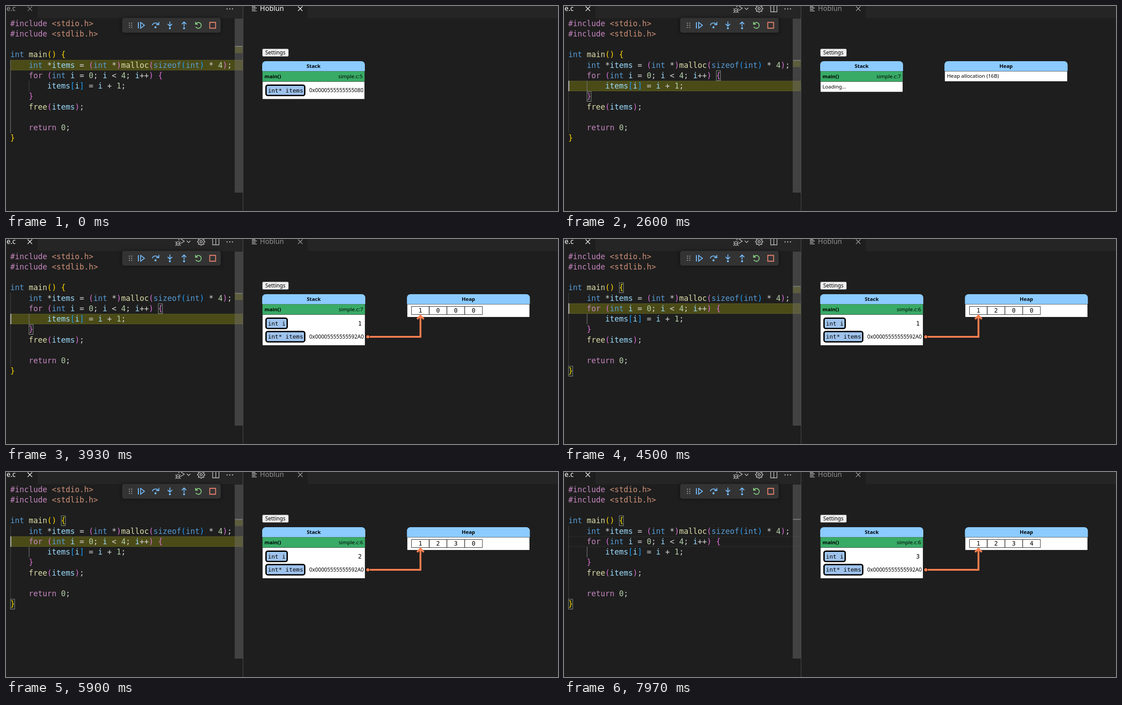
Recreate the animation shown at these times as an HTML page with a canvas. Size 1226 px wide and 457 px high, loop 8 s.

```html
<!DOCTYPE html>
<html lang="en">
<head>
<meta charset="utf-8">
<title>Debugger stepping through a loop</title>
<style>
html, body { margin: 0; width: 100%; height: 100%; overflow: hidden; background: #1e1e1e; }
canvas { display: block; }
</style>
</head>
<body>
<canvas id="stage" width="1226" height="457"></canvas>
<script>
const ctx = document.getElementById('stage').getContext('2d');
const LOOP = 8000, CODE_X = 9.4, CHAR_W = 10.26, ROW_H = 23.25;
const SANS = '"Noto Sans", sans-serif', MONO = '"DejaVu Sans Mono", monospace';
const CODE = `#include <stdio.h>
#include <stdlib.h>

int main() {
    int *items = (int *)malloc(sizeof(int) * 4);
    for (int i = 0; i < 4; i++) {
        items[i] = i + 1;
    }
    free(items);

    return 0;
}`.split('\n');

// [highlight off, line moves, brackets update, memory loaded, line, i, filled items]
const STEPS = [
  [1070, 1070, 1100, 1100, 6, 0, 0],
  [2470, 2570, 2600, 2630, 7, 0, 0],
  [3100, 3200, 3230, 3270, 6, 0, 1],
  [3830, 3830, 3900, 3930, 7, 1, 1],
  [4300, 4430, 4500, 4500, 6, 1, 2],
  [5200, 5200, 5230, 5270, 7, 2, 2],
  [5700, 5830, 5870, 5900, 6, 2, 3],
  [6500, 6500, 6700, 6700, 7, 3, 3],
  [7170, 7200, 7270, 7270, 6, 3, 4],
  [7970, 9000, 9000, 9000, 6, 3, 4]
];
const CURSOR_TOGGLES = [1070, 1500, 1970, 2470, 2570, 3100, 3200, 3670, 3830, 4300,
  4430, 4930, 5200, 5700, 5830, 6330, 6500, 7000, 7200, 7700];

function stateAt(t) {
  const s = { line: 5, highlight: true, bracketLine: 5, loading: false, i: null, filled: 0 };
  for (const [off, move, brackets, done, line, i, filled] of STEPS) {
    if (t >= off) s.highlight = false;
    if (t >= move) Object.assign(s, { line, highlight: true, loading: true });
    if (t >= brackets) s.bracketLine = line;
    if (t >= done) Object.assign(s, { loading: false, i, filled });
  }
  s.focused = t >= STEPS[0][0];
  s.cursor = CURSOR_TOGGLES.filter(x => x <= t).length % 2 === 1;
  return s;
}

const rowTop = n => 27.2 + (n - 1) * ROW_H;
const colX = n => CODE_X + n * CHAR_W;

function rect(x, y, w, h, fill) {
  ctx.fillStyle = fill;
  ctx.fillRect(x, y, w, h);
}
function box(x, y, w, h, radius, fill, stroke, lineWidth = 1) {
  ctx.beginPath();
  ctx.roundRect(x, y, w, h, radius);
  if (fill) { ctx.fillStyle = fill; ctx.fill(); }
  if (stroke) { ctx.strokeStyle = stroke; ctx.lineWidth = lineWidth; ctx.stroke(); }
}
function text(str, x, y, font, fill, align = 'left') {
  ctx.font = font;
  ctx.fillStyle = fill;
  ctx.textAlign = align;
  ctx.fillText(str, x, y);
}
function path(d, stroke, lineWidth = 1.6, x = 0, y = 0) {
  ctx.save();
  ctx.translate(x, y);
  ctx.strokeStyle = stroke;
  ctx.lineWidth = lineWidth;
  ctx.stroke(new Path2D(d));
  ctx.restore();
}
function dot(x, y, r, fill) {
  ctx.beginPath();
  ctx.arc(x, y, r, 0, 7);
  ctx.fillStyle = fill;
  ctx.fill();
}
const cross = (x, color) => path('M-5-5L5 5M5-5L-5 5', color, 1.4, x, 6);

function tokenColor(token, next) {
  if (/^(#|for$|return$)/.test(token)) return '#c586c0';
  if (/^<\w/.test(token)) return '#ce9178';
  if (/^(int|sizeof)$/.test(token)) return '#569cd6';
  if (/^\d/.test(token)) return '#b5cea8';
  if (/^\w/.test(token)) return next === '(' ? '#dcdcaa' : '#9cdcfe';
  return '#d4d4d4';
}
function drawCode() {
  const pairs = ['#ffd700', '#da70d6', '#179fff'];
  let depth = 0;
  CODE.forEach((line, row) => {
    for (const m of line.matchAll(/#\w+|<\w+\.h>|\w+|\S/g)) {
      const token = m[0];
      let color = tokenColor(token, line[m.index + token.length]);
      if ('([{'.includes(token)) color = pairs[depth++];
      else if (')]}'.includes(token)) color = pairs[--depth];
      text(token, colX(m.index), rowTop(row + 1) + 17.5, '17.04px ' + MONO, color);
    }
  });
}

function drawTabs(focused) {
  const left = focused ? '#ffffff' : '#a0a0a0', right = focused ? '#8f8f8f' : '#ffffff';
  const font = '15.4px ' + SANS, gray = '#c5c5c5';
  rect(0, 0, 1226, 27, '#252526');
  rect(0, 0, 70, 27, '#1e1e1e');
  rect(527, 0, 143, 27, '#1e1e1e');
  text('simple.c', 21.5, 11, font, left, 'right');
  cross(53, focused ? '#ffffff' : '#808080');
  path('M546 1.5h8M546 4.5h11M546 8h8M546 11.2h11', gray, 1.3);
  text('Hoblun', 564, 11, font, right);
  cross(653.5, focused ? '#a0a0a0' : '#ffffff');
  for (const x of [491, 497, 503]) dot(x, 6.5, 1.3, gray);
  if (!focused) return;
  path('M384 3V-3L396 5L388 10', gray, 1.4);
  path('M379 9a3 3.5 0 0 1 6 0v2a3 3.5 0 0 1-6 0zM376 6l3 2M388 6l-3 2M376 10.5h12M376 15l3-2M388 15l-3-2', gray, 1.2);
  path('M401.5 4l4 4l4-4', gray, 1.3);
  ctx.beginPath();
  for (let k = 0; k < 32; k++) {
    const a = (k - 0.5) * Math.PI / 16, r = k % 4 < 2 ? 8.2 : 6;
    ctx.lineTo(433.5 + r * Math.cos(a), 6 + r * Math.sin(a));
  }
  ctx.closePath();
  ctx.strokeStyle = gray;
  ctx.lineWidth = 1.4;
  ctx.stroke();
  path('M436 6a2.5 2.5 0 1 0-5 0a2.5 2.5 0 1 0 5 0', gray, 1.3);
  path('M459-3h14v16h-14zM466-3v16', gray, 1.4);
}

function drawToolbar() {
  const blue = '#75beff';
  ctx.save();
  ctx.shadowColor = 'rgba(0,0,0,.5)';
  ctx.shadowBlur = 8;
  box(258, 26.5, 219, 33, 5, '#333333');
  ctx.restore();
  for (let k = 0; k < 6; k++) rect(273 + k % 2 * 5, 37 + (k >> 1) * 4.7, 2.4, 2.4, '#8a8a8a');
  path('M294 36v14', blue, 2);
  path('M299 36.5v13l8.5-6.5z', blue, 1.8);
  path('M325 43a7.5 7 0 0 1 13.5-2M339.5 35.5v6h-6', blue, 1.8);
  dot(332, 47.5, 2.2, blue);
  path('M364 34.5v10M359 40l5 5l5-5', blue, 1.8);
  dot(364, 49.5, 2.2, blue);
  path('M395.5 46v-10M390.5 40.5l5-5l5 5', blue, 1.8);
  dot(395.5, 49.5, 2.2, blue);
  path('M421.5 40a6.5 6.5 0 1 1 0 6.5M421 35.5v5h5', '#89d185', 1.8);
  path('M452.5 36.5h13v13h-13z', '#f48771', 1.8);
}

function drawEditor(s) {
  const top = rowTop(s.line);
  rect(10, top, 516, 1.6, '#282828');
  rect(10, top + ROW_H - 1.6, 516, 1.6, '#282828');
  if (s.highlight) rect(10, top, 516, ROW_H, 'rgba(255,255,0,.2)');

  const outer = s.line === 5;
  rect(9.5, rowTop(5), 1.3, ROW_H * 7, outer ? '#707070' : '#404040');
  rect(50.7, rowTop(7), 1.3, ROW_H, outer ? '#404040' : '#707070');

  const pairs = { 6: [[4, 11], [12, 0]], 7: [[6, 32], [8, 4]] }[s.bracketLine] || [];
  for (const [row, col] of pairs)
    box(colX(col) + 0.6, rowTop(row) + 0.6, CHAR_W - 1, ROW_H - 1.2, 0, 'rgba(0,100,0,.1)', '#888888', 1.1);
  drawCode();
  if (s.cursor) rect(9.5, top, 2.4, ROW_H, '#aeafad');

  const mark = 89 + (s.line - 5) * 15.6;
  if (s.highlight) rect(508.5, mark + 2, 17, 14, 'rgba(255,255,0,.2)');
  rect(508, 28, 18, 388, 'rgba(121,121,121,.4)');
  rect(508.5, mark, 17, 2, '#7c7c78');
  rect(526, 0, 1, 457, '#505050');
}

function panel(title, x, w, bottom) {
  box(x, 123, w, 23, [8, 8, 0, 0], '#8bcbff');
  rect(x, 145, w, bottom - 145, '#000000');
  rect(x + 0.8, 145.6, w - 1.6, bottom - 146.2, '#ffffff');
  text(title, x + w / 2, 137.5, 'bold 11.4px ' + SANS, '#000000', 'center');
}
function variable(name, y, w) {
  box(577.5, y - 11.5, w - 3, 23, 4, '#9fc3ec', '#000000', 3);
  text(name, 581.7, y + 4.6, '13px ' + MONO, '#000000');
}
function drawMemory(s) {
  const small = '11.6px ' + SANS, mono = '13.3px ' + MONO, black = '#000000';
  const allocated = s.i !== null;
  const width = s.loading ? 184 : allocated ? 229 : 228;
  const right = 569 + width;

  box(569.5, 95.5, 58, 17, 2.5, '#efefef', '#767676');
  text('Settings', 598.2, 108.2, '11.8px ' + SANS, black, 'center');

  panel('Stack', 569, width, s.loading ? 192 : allocated ? 237.5 : 208);
  rect(569.8, 145.6, width - 1.6, 22.4, '#38ab66');
  rect(569, 168, width, 0.8, '#222222');
  text('main()', 574, 160.7, 'bold 11.4px ' + SANS, black);
  text('simple.c:' + s.line, right - 5, 160.7, '11.5px ' + SANS, black, 'right');

  if (s.loading) {
    text('Loading...', 574, 184.2, '11.4px ' + SANS, black);
    panel('Heap', 845, 273.5, 168.5);
    text('Heap allocation (16B)', 850.5, 160.2, small, black);
    return;
  }
  const y = allocated ? 217.7 : 188;
  variable('int* items', y, 89);
  text(allocated ? '0x00005555555592A0' : '0x0000555555555080', 673.5, y + 4, '11.75px ' + SANS, black);
  if (!allocated) return;

  variable('int i', 188, 50);
  text(s.i, 786, 192.6, mono, black, 'center');
  panel('Heap', 890.5, 273, 174.5);
  for (let k = 0; k < 4; k++) {
    const x = 900.5 + k * 39.4;
    box(x, 150.5, 39.4, 18, 0, null, '#222222', 1);
    text(k < s.filled ? k + 1 : 0, x + 19.7, 164, mono, black, 'center');
  }
  dot(803.7, 218, 5, '#111111');
  dot(803.7, 218, 3.6, '#ff7f50');
  path('M808 218H920.5V172M913 178.5L920.5 171L928 178.5', '#ff7f50', 4);
}

function draw(now) {
  const s = stateAt(now % LOOP);
  rect(0, 0, 1226, 457, '#1e1e1e');
  drawEditor(s);
  drawTabs(s.focused);
  rect(526, 0, 1, 457, '#505050');
  drawToolbar();
  drawMemory(s);
}

const start = performance.now();
function tick() {
  draw(performance.now() - start);
  requestAnimationFrame(tick);
}
tick();
</script>
</body>
</html>
```
